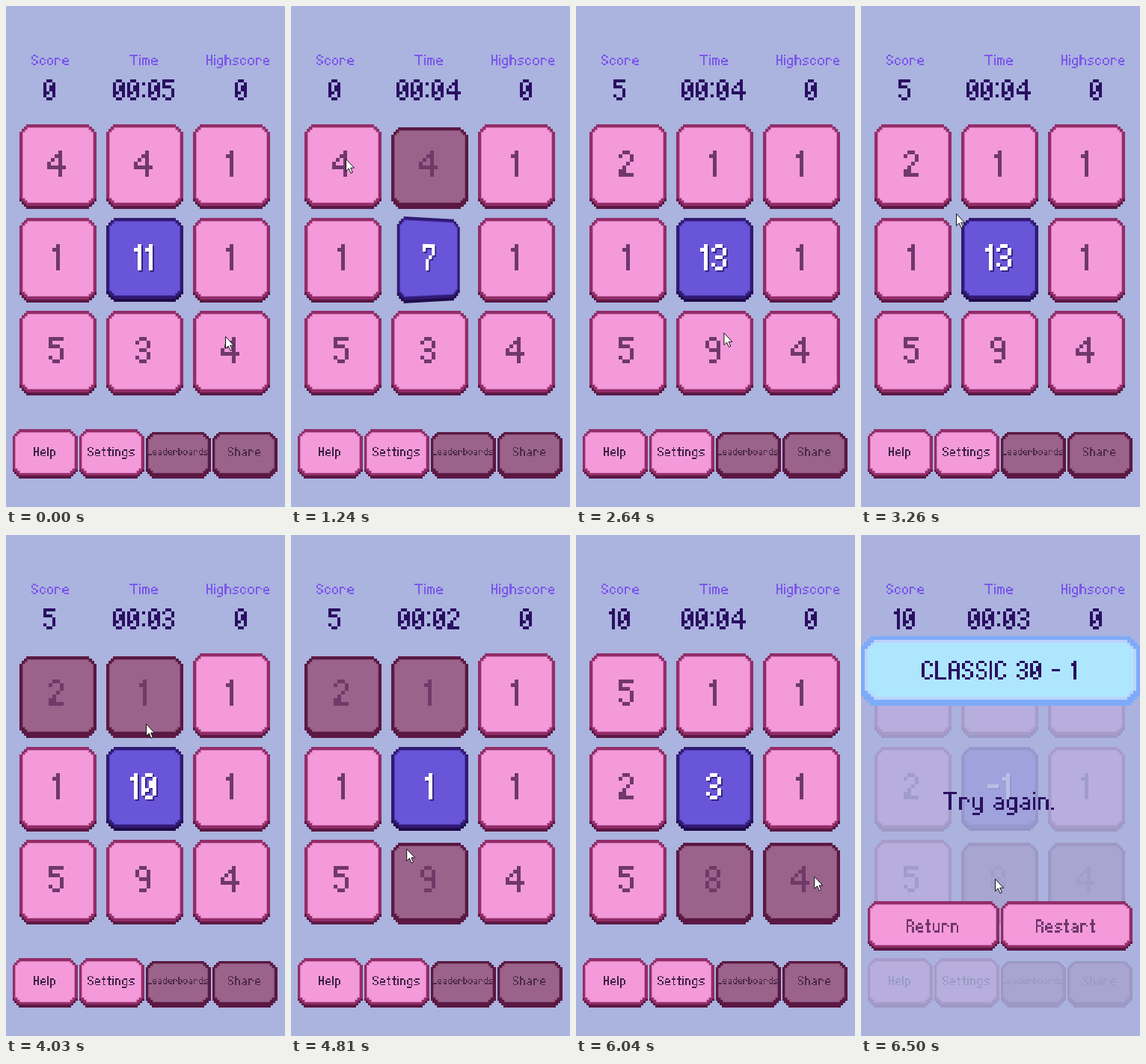
Animation, 373 px wide and 669 px high, one loop 6.81 s. Source, as an HTML page:

```html
<!DOCTYPE html>
<html lang="en">
<head>
<meta charset="utf-8">
<title>Number tiles</title>
<style>
  html, body { margin: 0; width: 100%; height: 100%; overflow: hidden; background: #abb3df; }
  svg { position: absolute; left: 0; top: 0; overflow: visible; shape-rendering: crispEdges; }
  #card { position: absolute; left: 134px; top: 283px; width: 103px; height: 112px; }
  text { font: 7px "DejaVu Sans Mono", monospace; fill: none; }
</style>
</head>
<body>
<svg id="board" width="373" height="669"></svg>
<div id="card"><svg id="face" width="103" height="112"></svg></div>
<svg width="373" height="669">
  <g id="popup"></g>
  <g id="header"></g>
  <path id="cursor" d="M.5.5V16.5L4.2 13L7 19.3L9.4 18.2L6.7 12.2H11.5Z" fill="#fff" stroke="#111" stroke-width="1" style="shape-rendering:auto"/>
</svg>
<script>
const LOOP = 6810;
const $ = id => document.getElementById(id);

// Pixel font, capitals 7 high: strokes on a grid, each point is x then y
const GLYPHS = {
  0: '102031352616050110 222314', 1: '1016 01', 2: '01102031320536 0636',
  3: '01102031322313 2334352616 05', 4: '3036 30030444', 5: '300002223435261605',
  7: '010030321416', 8: '10203132231302 0110 2334352616050413', 9: '102031352616 100102133 3'.replace(/ 3$/, '3'),
  '-': '0323', ':': '01 05', '.': '06',
  A: '060110203136 0333', C: '3120100105162635', H: '0006 3036 0333', I: '0006', L: '000636',
  R: '06002031322303 3436', S: '312010010213233435261605', T: '0040 2026',
  a: '12223336 3414051636', b: '0006 022233352606', c: '3322120305162635',
  d: '3036 321203051636', e: '043433221203051636', g: '32372808 321203051636',
  h: '0006 02223336', i: '00 0206', l: '0006', m: '0206 02324346 2226', n: '0206 02223336',
  o: '122233352616050312', p: '0208 022233352606', r: '0206 03122233',
  s: '3212031424352606', t: '101626 0222', u: '02051636 3236', y: '02051636 32372808'
};

function trace(stroke) {
  const pts = stroke.match(/../g).map(p => [+p[0], +p[1]]);
  const out = [pts[0]];
  for (let i = 1; i < pts.length; i++) {
    const [ax, ay] = pts[i - 1], [bx, by] = pts[i];
    const n = Math.max(Math.abs(bx - ax), Math.abs(by - ay));
    for (let k = 1; k <= n; k++)
      out.push([Math.round(ax + (bx - ax) * k / n), Math.round(ay + (by - ay) * k / n)]);
  }
  return out;
}

const font = { ' ': { dots: [], w: 2 } };
for (const ch in GLYPHS) {
  const dots = GLYPHS[ch].split(' ').flatMap(trace);
  font[ch] = { dots, w: Math.max(...dots.map(d => d[0])) + 1 };
}

// Text centred on cx, with the capitals centred on cy
function label(str, cx, cy, px, fill, shadow) {
  let x = 0, d = '';
  for (const ch of String(str)) {
    for (const [gx, gy] of font[ch].dots) d += `M${x + gx} ${gy}h1v1h-1z`;
    x += font[ch].w + 1;
  }
  const left = cx - (x - 1) * px / 2, top = cy - 3.5 * px;
  const under = shadow ? `<path d="${d}" fill="${shadow}" transform="translate(.4 .5)"/>` : '';
  return `<g transform="translate(${left} ${top}) scale(${px})">${under}<path d="${d}" fill="${fill}"/><text y="7">${str}</text></g>`;
}

// Box with n stair steps of size u at each corner
function box(x, y, w, h, u, n, fill) {
  const st = [];
  for (let i = 0; i <= n; i++) {
    st.push([i * u, (n - i) * u]);
    if (i < n) st.push([(i + 1) * u, (n - i) * u]);
  }
  const back = [...st].reverse();
  const pts = [
    ...st,
    ...back.map(([a, b]) => [w - a, b]),
    ...st.map(([a, b]) => [w - a, h - b]),
    ...back.map(([a, b]) => [a, h - b])
  ];
  return `<polygon points="${pts.map(([a, b]) => [x + a, y + b]).join(' ')}" fill="${fill}"/>`;
}

const PINK = { ledge: '#5a1842', edge: '#932c68', rim: '#cf74b1', face: '#f49adb', ink: '#70386c' };
const DARK = { ledge: '#5a1842', edge: '#5a1842', rim: '#854c70', face: '#9b638b', ink: '#6f3a69' };
const BLUE = { ledge: '#1f0a48', edge: '#311a74', rim: '#4e3bb0', face: '#6955d7' };

function tile(x, y, w, h, u, c) {
  if (c === DARK) { y += u; h -= u; }
  const s = u * .8;
  return box(x, y, w, h, s, 3, c.ledge) +
    box(x, y, w, h - u, s, 3, c.edge) +
    box(x + u, y + u, w - 2 * u, h - 3 * u, s, 2, c.rim) +
    box(x + u + 1, y + u + 1, w - 2 * u - 2, h - 3 * u - 2, s, 2, c.face);
}

// Each round: start, clock base, score, target, tile values and [tile, time] taps
const ROUNDS = [
  { at: 0, clock: 680, score: 0, target: 11, vals: '4411-1534', taps: [[1, 780], [0, 1470], [7, 2480]] },
  { at: 2560, clock: 2560, score: 5, target: 13, vals: '2111-1594', taps: [[0, 3410], [1, 3720], [7, 4640], [3, 5030]] },
  { at: 5110, clock: 5110, score: 10, target: 11, vals: '5112-1584', taps: [[7, 5640], [8, 6040]] }
];
const FLIPS = [920, 1700, 2640, 5110], FLIP = 400;
const ROWS = [158, 283, 407];

const PATH = [
  [0, 293, 441], [80, 290, 430], [690, 235, 205], [780, 215, 200], [900, 196, 202],
  [1240, 73, 204], [1400, 74, 207], [1470, 82, 210], [1700, 82, 212], [2000, 317, 310],
  [2250, 275, 359], [2400, 250, 385], [2480, 205, 430], [2800, 190, 442], [3020, 196, 424],
  [3110, 190, 390], [3260, 127, 277], [3410, 92, 226], [3720, 156, 218], [3870, 168, 230],
  [4030, 187, 252], [4570, 195, 464], [4640, 195, 462], [5030, 95, 356], [5190, 91, 352],
  [5300, 91, 352], [5620, 188, 446], [5940, 322, 452], [6060, 318, 456], [6350, 179, 459], [6810, 179, 459]
];

function cursorAt(t) {
  const i = Math.max(1, PATH.findIndex(p => p[0] > t));
  const [ta, xa, ya] = PATH[i - 1], [tb, xb, yb] = PATH[i];
  const k = (t - ta) / (tb - ta), e = k * k * (3 - 2 * k);
  return [xa + (xb - xa) * e, ya + (yb - ya) * e];
}

const cache = {};
function put(id, html) {
  if (cache[id] !== html) $(id).innerHTML = cache[id] = html;
}

const MENU = [['Help', 8.5, 1.83], ['Settings', 97.5, 1.83], ['Leaderboards', 186.5, 1.37], ['Share', 275.5, 1.83]];
const menu = MENU.map(([s, x, px], i) =>
  tile(x, 565, 87, 66, 3.6, i < 2 ? PINK : DARK) + label(s, x + 43, 595, px, i < 2 ? '#40223f' : '#4d2a49')).join('');

const popup = '<rect width="373" height="669" fill="#abb3df" opacity=".83"/>' +
  box(0, 135, 373, 93, 4, 3, '#7eabf8') +
  box(5, 140, 363, 80, 4, 3, '#bcd3fc') +
  box(9, 144, 355, 72, 4, 2, '#aee6fe') +
  label('CLASSIC 30 - 1', 184.5, 180.5, 3.63, '#2a1060') +
  label('Try again.', 184, 355, 3.52, '#2a1060') +
  [['Return', 8.5], ['Restart', 186.5]].map(([s, x]) =>
    tile(x, 489, 176, 66, 3.6, PINK) + label(s, x + 87, 522, 2.47, PINK.ink)).join('');

function draw(t) {
  const round = ROUNDS.filter(r => r.at <= t).pop();
  const down = round.taps.filter(p => p[1] <= t).map(p => p[0]);
  const left = round.taps.filter(p => p[1] + 80 <= t)
    .reduce((sum, p) => sum - round.vals[p[0]], round.target);
  const secs = 4 - Math.floor((t - round.clock) / 1020);

  let tiles = '';
  for (let i = 0; i < 9; i++) {
    if (i === 4) continue;
    const x = 17.5 + 116 * (i % 3), y = ROWS[Math.floor(i / 3)];
    const c = down.includes(i) ? DARK : PINK;
    tiles += tile(x, y, 103.5, 113, 4, c) + label(round.vals[i], x + 49.5, y + 52.5, 5, c.ink);
  }
  put('board', tiles + menu);

  put('face', tile(0, 0, 103, 112, 4, BLUE) + label(left, 49.5, 52, 5, '#fff', '#35247f'));
  const start = FLIPS.find(s => t >= s && t < s + FLIP);
  const p = start === undefined ? 0 : (t - start) / FLIP;
  const angle = p < .5 ? -180 * p : 180 * (1 - p);
  $('card').style.transform = p ? `perspective(700px) rotateY(${angle}deg)` : 'none';

  put('header',
    [['Score', 59], ['Time', 184], ['Highscore', 310]].map(([s, x]) => label(s, x, 72, 2.06, '#7c58ea')).join('') +
    [[round.score, 58], ['00:0' + secs, 184], [0, 314]].map(([s, x]) => label(s, x, 112, 3.92, '#2a0f62')).join(''));

  put('popup', popup);
  $('popup').setAttribute('opacity', Math.min(1, Math.max(0, (t - 6050) / 290)));

  const [cx, cy] = cursorAt(t);
  $('cursor').setAttribute('transform', `translate(${cx.toFixed(1)} ${cy.toFixed(1)})`);
  $('cursor').setAttribute('visibility', t >= 6340 && t < 6495 ? 'hidden' : 'visible');
}

const began = performance.now();
function tick() {
  draw((performance.now() - began) % LOOP);
  requestAnimationFrame(tick);
}
tick();
</script>
</body>
</html>
```
